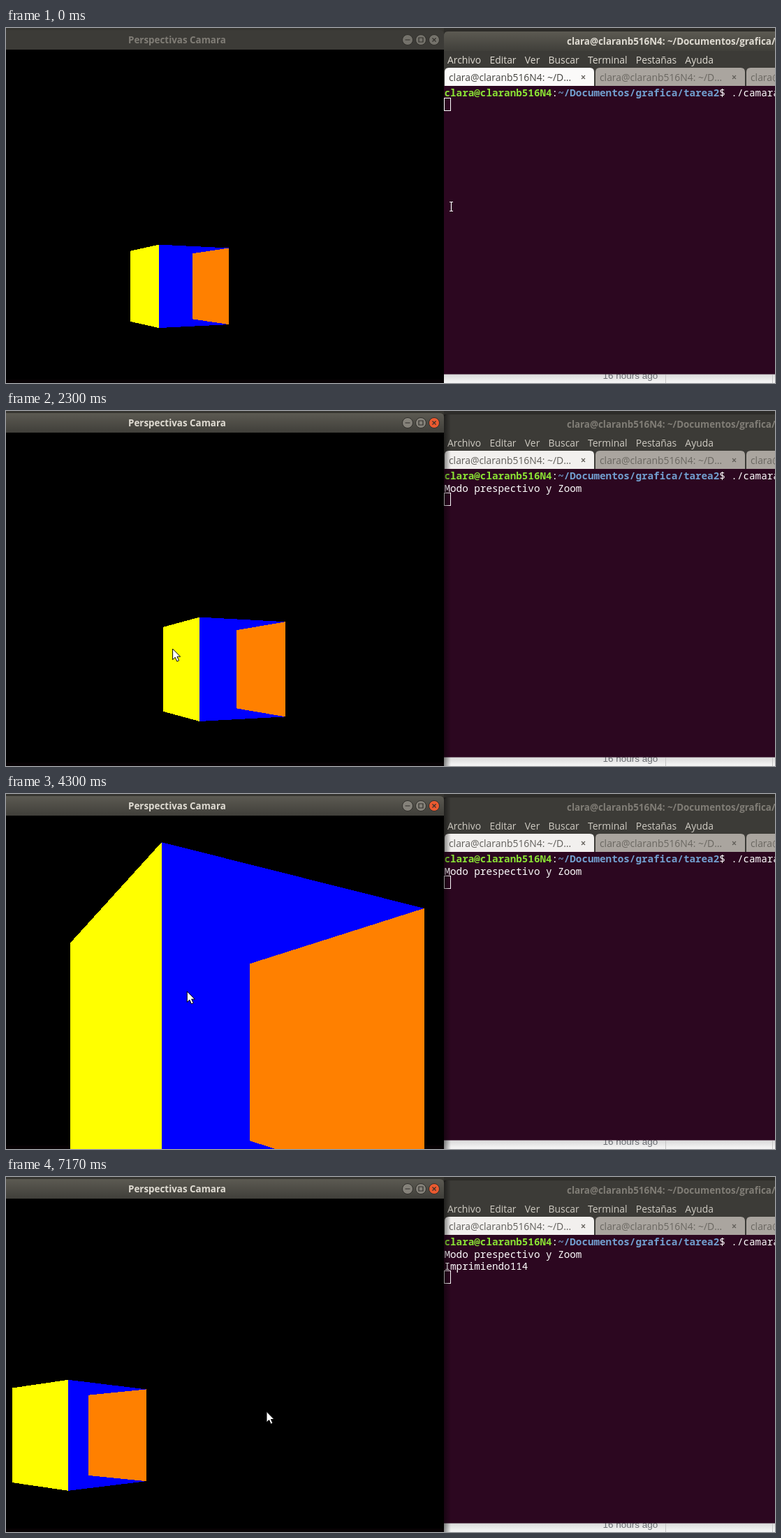
Animation, 1101 px wide and 509 px high, one loop 7210 ms. Source, as an HTML page:

```html
<!DOCTYPE html>
<html lang="es">
<head>
<meta charset="utf-8">
<title>Perspectivas Camara</title>
<style>
  html, body { margin: 0; width: 100%; height: 100%; overflow: hidden; background: #000; }
  svg { display: block; width: 1101px; height: 509px; }
  text { font: 13.9px "Open Sans", "Noto Sans", sans-serif; white-space: pre; }
  .title { font-weight: 700; font-size: 13.4px; }
  .mono { font: 14.28px "Noto Sans Mono", "DejaVu Sans Mono", monospace; fill: #fff; }
  .mono .b { font-weight: 700; }
  .web { font: 13.5px "Liberation Sans", Arial, sans-serif; fill: #6a6d72; }
  #menu { fill: #dfdbd2; }
  #cube { shape-rendering: crispEdges; }
</style>
</head>
<body>
<svg viewBox="0 0 1101 509">
  <defs>
    <linearGradient id="bar" x2="0" y2="1">
      <stop stop-color="#5c5a52"/><stop offset="1" stop-color="#403f3a"/>
    </linearGradient>
    <linearGradient id="page" x2="0" y2="1">
      <stop stop-color="#cfcfcf"/><stop offset="1" stop-color="#f7f7f7"/>
    </linearGradient>
    <linearGradient id="dim">
      <stop stop-opacity=".45"/><stop offset="1" stop-opacity="0"/>
    </linearGradient>
    <clipPath id="view"><rect y="31" width="627" height="478"/></clipPath>
  </defs>

  <!-- page behind the terminal -->
  <rect x="627" y="492" width="474" height="17" fill="url(#page)"/>
  <path d="M944.5 497V509M1097.5 497V509" stroke="#c4c4c4"/>
  <text class="web" x="854.5" y="502.5">16 hours ago</text>

  <!-- terminal window -->
  <rect x="627" width="474" height="40" fill="#2d2c29"/>
  <path d="M627 83V11q0-6 6-6H1101V83Z" fill="#3c3b37"/>
  <path id="termBar" d="M627 33V11q0-6 6-6H1101V33Z"/>
  <text id="termTitle" class="title" x="803" y="24">clara@claranb516N4: ~/Documentos/grafica/tarea2</text>
  <text id="menu" x="632" y="50.5"></text>
  <path d="M844 83V63q0-6 6-6H1052q6 0 6 6V83ZM1060 83V63q0-6 6-6H1101V83Z" fill="#aaa59f"/>
  <path id="tab" d="M628 83V63q0-6 6-6H836q6 0 6 6V83Z"/>
  <text id="tabText" x="634" y="75.5">clara@claranb516N4: ~/D…</text>
  <g fill="#6a6761">
    <text x="850" y="76">clara@claranb516N4: ~/D…</text>
    <text x="1066" y="76">clara@claranb516N4: ~/D…</text>
  </g>
  <path d="M824 68l5 5m0-5l-5 5M1040 68l5 5m0-5l-5 5" stroke="#5f5c57" stroke-width="1.2"/>
  <rect x="627" y="83" width="474" height="413.5" fill="#2c0720"/>
  <text class="mono" x="627.5" y="98"><tspan class="b" fill="#8ae234">clara@claranb516N4</tspan>:<tspan class="b" fill="#729fcf">~/Documentos/grafica/tarea2</tspan>$ ./camara</text>
  <text id="line1" class="mono" x="627.5" y="115.5">Modo prespectivo y Zoom</text>
  <text id="line2" class="mono" x="627.5" y="132.5">Imprimiendo114</text>
  <rect id="caret" x="627.5" width="9" height="18" fill="none" stroke="#fff"/>
  <rect id="shadow" x="627" y="5" width="10" height="504" fill="url(#dim)"/>

  <!-- drawing window -->
  <rect width="627" height="509" fill="#000"/>
  <rect y="504" width="627" height="5" fill="#070204"/>
  <rect width="627" height="31" fill="#363530"/>
  <path id="viewBar" d="M0 31V3H621q6 0 6 6V31Z"/>
  <text id="viewTitle" class="title" x="175" y="22">Perspectivas Camara</text>
  <g id="buttons" stroke="#302f2b">
    <circle cx="575" cy="17" r="7.5"/>
    <circle cx="594" cy="17" r="7.5"/>
    <circle id="close" cx="613" cy="17" r="7.5"/>
    <path d="M571.5 17h7M591 14h6v6h-6ZM610.5 14.5l5 5m0-5l-5 5" fill="none" stroke-width="1.2"/>
  </g>
  <g id="cube" clip-path="url(#view)">
    <polygon id="yellow" fill="#ff0"/>
    <polygon id="blue" fill="#00f"/>
    <polygon id="orange" fill="#ff8000"/>
  </g>

  <g id="pointer">
    <path id="arrow" d="M0 0V15.5L3.6 12.2L6.2 18L9 16.8L6.4 11.2H11Z" fill="#fff" stroke="#000"/>
    <path id="beam" d="M-2.5-6.5h5m-2.5 0v13m-2.5 0h5" fill="none" stroke="#fff" stroke-width="1.2"/>
  </g>
</svg>
<script>
const $ = id => document.getElementById(id);
const set = (id, attrs) => { for (const k in attrs) $(id).setAttribute(k, attrs[k]); };
const show = (id, on) => set(id, { visibility: on ? 'visible' : 'hidden' });
const mix = (a, b, p) => a + (b - a) * p;

const LOOP = 7210, FOCUS = 1000, MODE = 1250, PRINT = 6600;
const FOCAL = 588, CX = 245, CY = 370.3;
const REST = { x: 637.5, y: 256 };

// turning points of the drag: time, pointer, sideways shift of the cube
const drag = [
  { t: 1450, x: 258.5, y: 360.3, side: -.218 },
  { t: 1600, x: 247, y: 357.5, side: -.057 },
  { t: 1950, x: 265, y: 356, side: -.36 },
  { t: 2230, x: 237, y: 346, side: .2 },
  { t: 2850, x: 251, y: 302.5, side: .33 },
  { t: 3030, x: 252, y: 303.4, side: .33 },
  { t: 3770, x: 338.5, y: 282, side: -.188 },
  { t: 4430, x: 240, y: 283.2, side: 0 },
  { t: 4870, x: 239, y: 329.3, side: .585 },
  { t: 5550, x: 354, y: 324.3, side: -.77 },
  { t: 5730, x: 330, y: 327, side: -.444 },
  { t: 6500, x: 373, y: 336.3, side: -.98 }
];

// the pointer turns the camera sideways and moves it with its height
const yawAt = x => (22.3 + .2045 * (x - 238)) * Math.PI / 180;
const depthAt = y => .927 + .051 * (y - 282);

$('menu').innerHTML = 'Archivo Editar Ver Buscar Terminal Pestañas Ayuda'.split(' ')
  .map((name, i) => `<tspan dx="${i ? 12.3 : 0}">${name}</tspan>`).join('');

function dragAt(t) {
  const i = drag.findIndex(k => k.t > t);
  if (i === 0) return drag[0];
  if (i < 0) return drag[drag.length - 1];
  const a = drag[i - 1], b = drag[i], p = (t - a.t) / (b.t - a.t);
  return { x: mix(a.x, b.x, p), y: mix(a.y, b.y, p), side: mix(a.side, b.side, p) };
}

function pointerAt(t, hold) {
  const p = Math.min(1, Math.max(0, (t - 250) / 750));
  const eased = p * p * (3 - 2 * p);
  return { x: mix(REST.x, hold.x, eased), y: mix(REST.y, hold.y, eased) };
}

// screen ends of a vertical cube edge of height 1
function edge(x, z) {
  const sx = CX + FOCAL * x / z, half = FOCAL / z / 2;
  return { top: [sx, CY - half], bottom: [sx, CY + half] };
}

const face = (id, a, b) => set(id, { points: [a.top, b.top, b.bottom, a.bottom].join(' ') });

function drawCube(x, z, yaw) {
  const c = Math.cos(yaw), s = Math.sin(yaw);
  const near = edge(x, z), right = edge(x + c, z + s);
  const left = edge(x - s, z + c), back = edge(x + c - s, z + s + c);
  face('yellow', left, near);
  face('blue', near, right);
  face('orange', back, right);
}

function drawFocus(onView) {
  const bar = on => ({ fill: on ? 'url(#bar)' : '#3c3b37' });
  const label = on => ({ fill: on ? '#dfdbd2' : '#807d76' });
  set('viewBar', bar(onView));
  set('viewTitle', label(onView));
  set('termBar', bar(!onView));
  set('termTitle', label(!onView));
  set('menu', { opacity: onView ? .9 : 1 });
  set('tab', { fill: onView ? '#f2f0ee' : '#fbfaf9' });
  set('tabText', { fill: onView ? '#605e5a' : '#44433f' });
  set('buttons', { fill: onView ? '#85827a' : '#74726b' });
  set('close', { fill: onView ? '#ea5a30' : '#74726b' });
  show('shadow', onView);
}

function draw(t) {
  const hold = dragAt(t), pointer = pointerAt(t, hold);
  drawCube(hold.side, depthAt(hold.y), yawAt(hold.x));
  drawFocus(t >= FOCUS);
  const lines = (t >= MODE) + (t >= PRINT);
  show('line1', lines > 0);
  show('line2', lines > 1);
  set('caret', { y: 100.5 + 17 * lines });
  const overText = pointer.x >= 627;
  set('pointer', { transform: `translate(${pointer.x} ${pointer.y})` });
  show('arrow', !overText);
  show('beam', overText);
}

const start = performance.now();
function tick() {
  draw((performance.now() - start) % LOOP);
  requestAnimationFrame(tick);
}
tick();
</script>
</body>
</html>
```
